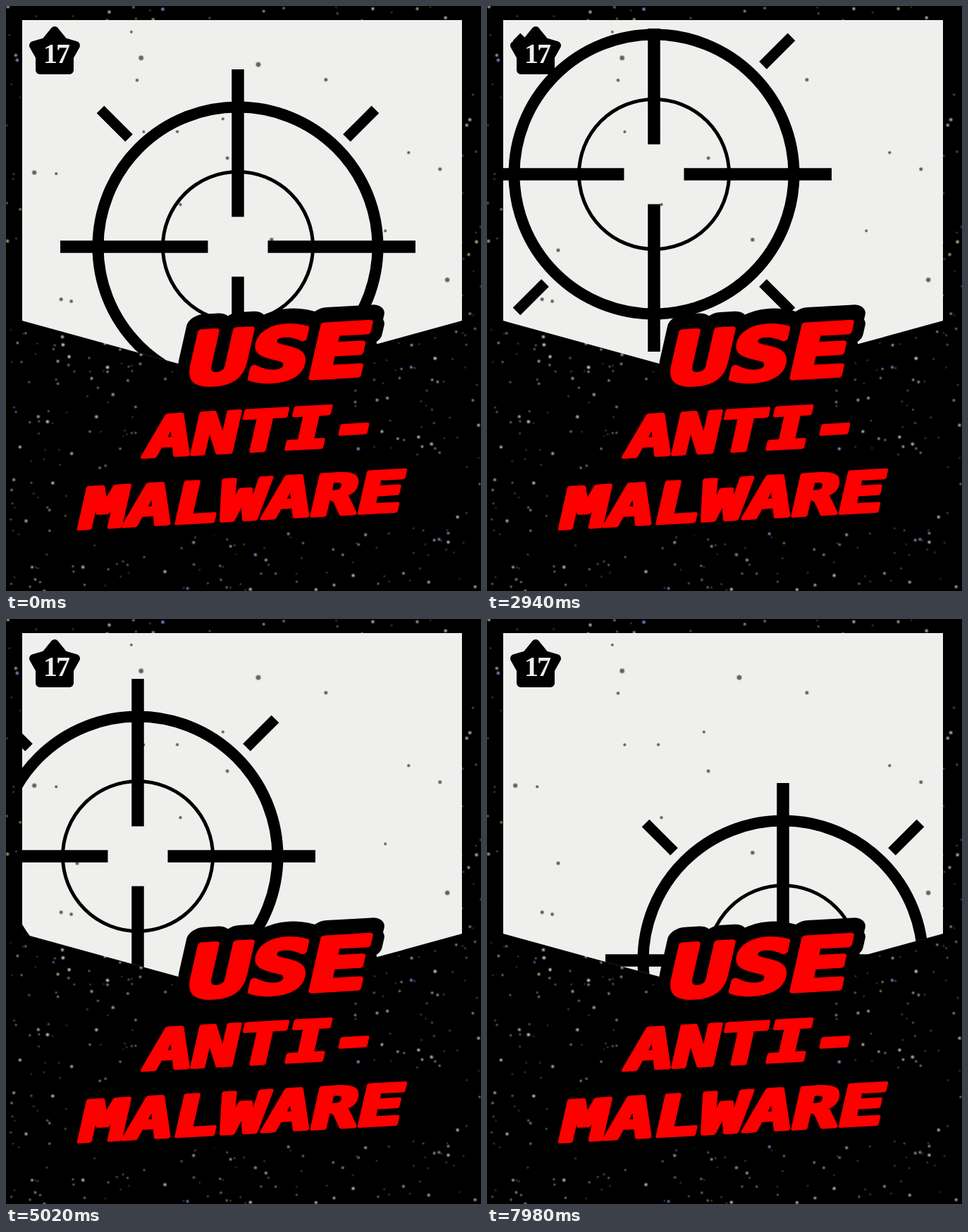
Recreate the animation shown at these times as an HTML page. Size 674 by 831 pixels, loop 8 s.

```html
<!DOCTYPE html>
<html lang="en">
<head>
<meta charset="utf-8">
<title>Use anti-malware</title>
<style>
  html, body { margin: 0; width: 100%; height: 100%; overflow: hidden; background: #000; }
  svg { display: block; width: 100vw; height: 100vh; }
  .word { font: bold 78px "DejaVu Sans Mono", monospace; stroke-linejoin: round; }
  .big { font-size: 101px; }
  .halo { fill: #000; stroke: #000; stroke-width: 30; }
  .red { fill: #f00; stroke: #f00; stroke-width: 5.5; }
  .red.big { stroke-width: 7.5; }
  .num { font: bold 40px "Liberation Serif", serif; letter-spacing: -2px; fill: #eee; }
</style>
</head>
<body>
<svg viewBox="0 0 674 831">
  <defs>
    <clipPath id="panelClip"><path d="M22 32H648V447L335 533L22 447Z"/></clipPath>
  </defs>
  <rect width="674" height="831"/>
  <g id="stars"></g>
  <path d="M23 20H647V447L335 533L23 447Z" fill="#efefee"/>
  <g id="specks"></g>
  <g clip-path="url(#panelClip)">
    <g id="sight" fill="none" stroke="#000">
      <circle r="198.5" stroke-width="16"/>
      <circle r="106.5" stroke-width="5"/>
      <g id="arms"></g>
    </g>
  </g>
  <path d="M69 35L82 51L99 56L90 72V91H48V72L39 56L56 51Z"
        stroke="#000" stroke-width="12" stroke-linejoin="round"/>
  <text class="num" x="53" y="81">17</text>
  <g id="words"></g>
</svg>
<script>
const LOOP = 8000;
const $ = id => document.getElementById(id);
const repeat = (n, make) => Array.from({ length: n }, (_, i) => make(i)).join("");

// Step, x, y: key points of the sight's drift
const PATH = [
  [1, 329, 342], [47, 278, 236], [83, 192, 267], [108, 187, 337],
  [128, 195, 399.5], [150, 299, 473], [172, 420, 485]
];

function seeded(seed) {
  return () => (seed = (seed * 16807) % 2147483647) / 2147483647;
}

function dot(x, y, r, fill, opacity) {
  return `<circle cx="${x.toFixed(1)}" cy="${y.toFixed(1)}" r="${r.toFixed(1)}" fill="${fill}" opacity="${opacity.toFixed(2)}"/>`;
}

function drawStars() {
  const rnd = seeded(1717);
  const tints = ["#fff", "#ddd", "#aab0ff", "#e8e0b0"];
  $("stars").innerHTML = repeat(850, i => {
    const x = rnd() * 674, y = rnd() * 831, glow = rnd() ** 2;
    const tint = tints[i % tints.length];
    return dot(x, y, 2 + glow, tint, .06 + glow * .22) + dot(x, y, 1.2 + glow * .6, tint, .12 + glow * .45);
  });
}

function drawSpecks() {
  const rnd = seeded(42);
  $("specks").innerHTML = repeat(20, () => {
    const x = 40 + rnd() * 590, y = 32 + rnd() * 390, size = rnd() ** 2;
    const r = 2.3 + size * 2.5;
    return dot(x, y, r, "#000", .25) + dot(x, y, r * .7, "#000", .45);
  });
}

function drawArms() {
  $("arms").innerHTML = repeat(4, i =>
    `<g transform="rotate(${i * 90})">` +
    `<path d="M42.5 0H252" stroke-width="17.5"/>` +
    `<path d="M154.5 154.5L195 195" stroke-width="15"/></g>`);
}

function drawWords() {
  const line = (cls, x, y, text) =>
    `<text class="word ${cls}" transform="translate(${x} ${y}) rotate(-3.2) skewX(-16) scale(1.4 1)">${text}</text>`;
  const layer = (cls, dy = 0) =>
    line(cls + " big", 253, 538 + dy, "USE") +
    line(cls, 193, 640.5 + dy, "ANTI-") +
    line(cls, 100, 742.5 + dy, "MALWARE");
  $("words").innerHTML = layer("halo", -10) + layer("halo", 5) + layer("red");
}

// Steps come in threes: two short holds, then a long one
function stepAt(ms) {
  const t = ms + 20;
  return 3 * Math.floor(t / 140) + Math.min(2, Math.floor(t % 140 / 20));
}

function slope(i, k) {
  const a = PATH[Math.max(0, i - 1)], b = PATH[Math.min(PATH.length - 1, i + 1)];
  return (b[k] - a[k]) / (b[0] - a[0]);
}

// Smooth curve through the key points
function pointAt(n) {
  let i = 0;
  while (i < PATH.length - 2 && n >= PATH[i + 1][0]) i++;
  const a = PATH[i], b = PATH[i + 1], h = b[0] - a[0], u = (n - a[0]) / h;
  const ease = u * u * (3 - 2 * u);
  return [1, 2].map(k => a[k] + (b[k] - a[k]) * ease
    + h * u * (1 - u) * ((1 - u) * slope(i, k) - u * slope(i + 1, k)));
}

function render(ms) {
  const [x, y] = pointAt(stepAt(ms));
  $("sight").setAttribute("transform", `translate(${x.toFixed(1)} ${y.toFixed(1)})`);
}

drawStars();
drawSpecks();
drawArms();
drawWords();
render(0);

let start;
function tick(now) {
  start ??= now;
  render((now - start) % LOOP);
  requestAnimationFrame(tick);
}
requestAnimationFrame(tick);
</script>
</body>
</html>
```
